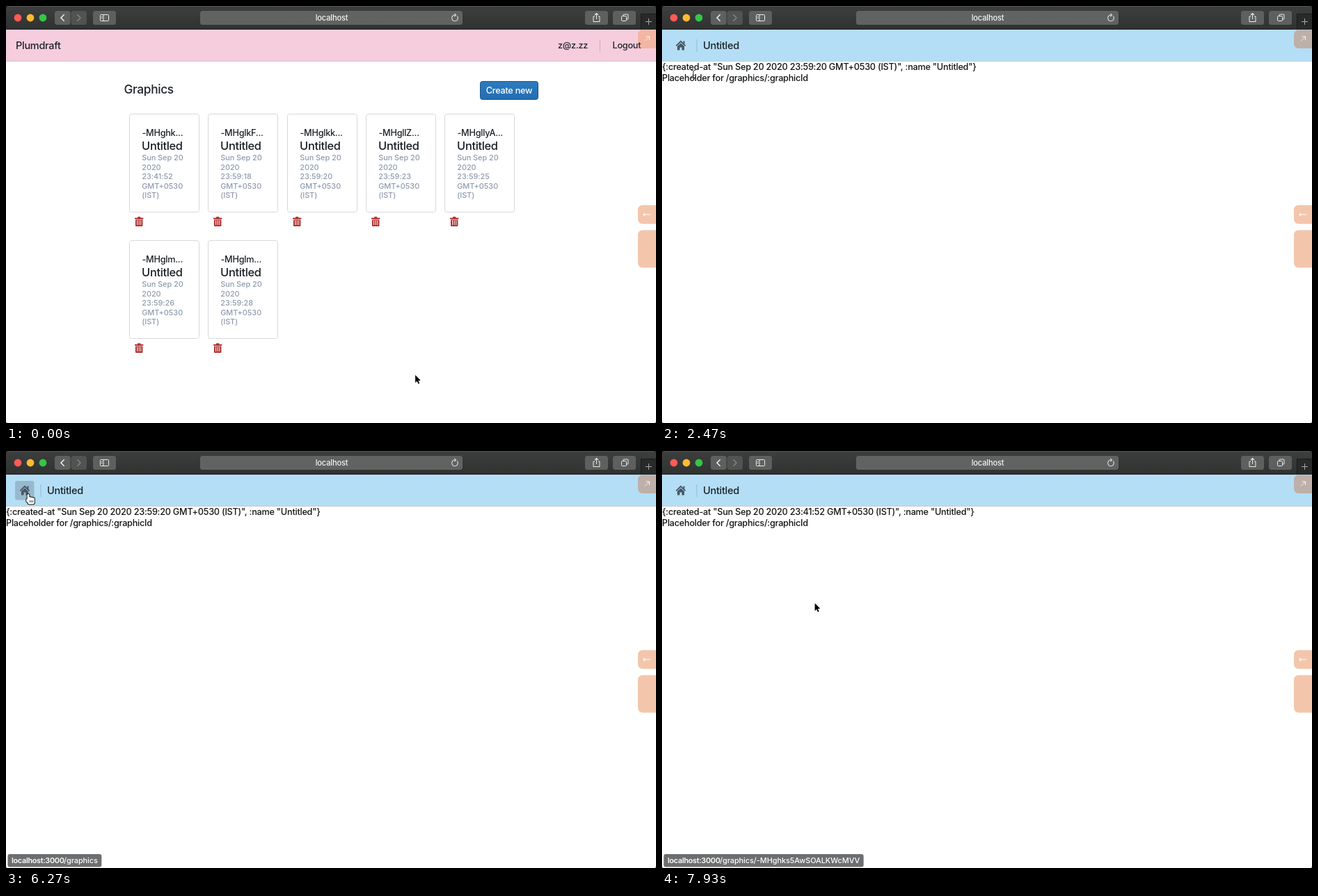
An HTML page with a canvas for the animation above (8000 ms loop, 934 by 600 pixels).

```html
<!DOCTYPE html>
<html lang="en">
<head>
<meta charset="utf-8">
<title>Graphics list</title>
<style>
html, body { margin: 0; width: 100%; height: 100%; overflow: hidden; background: #fff; }
canvas { display: block; }
</style>
</head>
<body>
<canvas id="stage" width="934" height="600"></canvas>
<script>
const ctx = document.getElementById('stage').getContext('2d');
const LOOP = 8000;
const LOAD = 150;    // ms until a new graphic replaces the previous one
const LINGER = 500;  // ms the status bar outlives its link
const CARD = { w: 100, h: 141 };
const HOME = { x: 13, y: 43, w: 27.5, h: 27.5, url: '/graphics' };

const cards = [
  '-MHghk... 23:41:52 -MHghks5AwSOALKWcMVV',
  '-MHglkF... 23:59:18',
  '-MHglkk... 23:59:20 -MHglkkZl3mWahlh6c3p',
  '-MHgllZ... 23:59:23',
  '-MHgllyA... 23:59:25',
  '-MHglm... 23:59:26',
  '-MHglm... 23:59:28'
].map((row, i) => {
  const [label, time, key = label] = row.split(' ');
  return {
    ...CARD, label, time, url: '/graphics/' + key,
    x: Math.round(177 + (i % 5) * 113.25) + 0.5,
    y: 155.5 + Math.floor(i / 5) * 182
  };
});

const origin = { x: 587.5, y: 530 };
const moves = [
  { from: 100, to: 1000, x: 447.5, y: 192 },
  { from: 1520, to: 2470, x: 45, y: 98 },
  { from: 2470, to: 2720, x: 33, y: 63 },
  { from: 3450, to: 3750, x: 38, y: 72 },
  { from: 4420, to: 4650, x: 33, y: 63 },
  { from: 6430, to: 6670, x: 93, y: 148 },
  { from: 6670, to: 7350, x: 219, y: 218 }
];

// A click opens a card, or the list when it has none
const clicks = [
  { at: 1330, card: cards[2], before: cards[0] },
  { at: 6490 },
  { at: 7700, card: cards[0], before: cards[2] }
];

function pointerAt(t) {
  return moves.reduce((p, m) => {
    const u = Math.min(1, Math.max(0, (t - m.from) / (m.to - m.from)));
    const k = u * u * (3 - 2 * u);
    return { x: p.x + (m.x - p.x) * k, y: p.y + (m.y - p.y) * k };
  }, origin);
}

function graphicAt(t) {
  const click = clicks.filter(c => c.at <= t).pop();
  if (!click || !click.card) return null;
  return t - click.at < LOAD ? click.before : click.card;
}

const inside = (p, b) => p.x >= b.x && p.x <= b.x + b.w && p.y >= b.y && p.y <= b.y + b.h;

const linkAt = t => (graphicAt(t) ? [HOME] : cards).find(b => inside(pointerAt(t), b));

function statusAt(t) {
  for (let age = 0; age <= LINGER && age <= t; age += 20) {
    const link = linkAt(t - age);
    if (link) return link.url;
  }
}

function text(str, x, y, size, color, { weight = 450, track = -0.02, align = 'left' } = {}) {
  ctx.font = `${weight} ${size}px Inter, sans-serif`;
  ctx.letterSpacing = `${track * size}px`;
  ctx.textAlign = align;
  ctx.fillStyle = color;
  ctx.fillText(str, x, y);
}

function rect(x, y, w, h, color) {
  ctx.fillStyle = color;
  ctx.fillRect(x, y, w, h);
}

function paint(fill, stroke, width = 1) {
  if (fill) { ctx.fillStyle = fill; ctx.fill(); }
  if (stroke) { ctx.strokeStyle = stroke; ctx.lineWidth = width; ctx.stroke(); }
}

function round(x, y, w, h, r, fill, stroke, width) {
  ctx.beginPath();
  ctx.roundRect(x, y, w, h, r);
  paint(fill, stroke, width);
}

function line(points, color, width = 1) {
  ctx.beginPath();
  points.forEach(([x, y]) => ctx.lineTo(x, y));
  paint(null, color, width);
}

function arc(x, y, r, a0, a1, fill, stroke) {
  ctx.beginPath();
  ctx.arc(x, y, r, a0, a1);
  paint(fill, stroke, 1.1);
}

// Arrow head with its tip at x, y, turned by angle
function chevron(x, y, size, angle, color, width = 1.1) {
  ctx.save();
  ctx.translate(x, y);
  ctx.rotate(angle);
  line([[-size, -size], [0, 0], [-size, size]], color, width);
  ctx.restore();
}

function vertical(y0, y1, top, bottom) {
  const g = ctx.createLinearGradient(0, y0, 0, y1);
  g.addColorStop(0, top);
  g.addColorStop(1, bottom);
  return g;
}

function drawToolbar() {
  const ink = '#eee', key = '#5e5f5f';
  rect(0, 0, 934, 34, vertical(0, 34, '#3d3e3e', '#303131'));
  rect(0, 0, 934, 1, '#555');
  rect(0, 33, 934, 1, '#222');
  ['#fc5b57', '#fdbc2e', '#34c648'].forEach((color, i) => arc(17 + i * 18, 17, 5.4, 0, 7, color));
  round(93.5, 7, 22.5, 20, 3.5, '#515252');
  round(70, 7, 22.5, 20, 3.5, key);
  [125, 832, 872].forEach(x => round(x, 7, 33, 20, 3.5, key));
  round(279, 7, 377, 20, 3.5, '#616262');

  chevron(79, 17, 4.7, Math.PI, ink, 1.5);
  chevron(107, 17, 4.7, 0, '#858686', 1.4);
  round(135.5, 12.5, 12, 9, 1, null, ink);
  rect(139.5, 12.5, 1, 9, ink);
  [15, 17].forEach(y => rect(137, y, 1.5, 1, ink));
  text('localhost', 468, 21, 11.2, '#f2f2f2', { align: 'center' });

  arc(645, 17.3, 4.3, -0.7, 4.9, null, '#ddd');
  chevron(646.6, 13, 2.2, 0, '#ddd');

  line([[846, 15], [844, 15], [844, 22.5], [853, 22.5], [853, 15], [851, 15]], ink);
  rect(848, 10.8, 1, 8.2, ink);
  chevron(848.5, 10.5, 2.5, -Math.PI / 2, ink);
  round(887, 12, 7, 7, 1, null, ink);
  round(884.5, 14.5, 7, 7, 1, key, ink);

  rect(912, 11, 22, 23, '#191919');
  rect(913, 12, 21, 22, '#282929');
  rect(919, 22, 9, 1, '#aaa');
  rect(923, 18, 1, 9, '#aaa');
}

function drawNavbar(color, dividerX) {
  rect(0, 34, 934, 45, color);
  rect(0, 79, 934, 1, 'rgba(60,75,90,.28)');
  rect(dividerX, 48, 1, 18, 'rgba(60,75,95,.24)');
}

function drawWidgets(topColor) {
  const peach = '#f3c6ab', pale = '#f8eeea';
  round(908, 34.5, 40, 26.5, 6.5, topColor);
  line([[918, 50.5], [924.5, 44]], pale);
  chevron(924.5, 44, 3.5, -Math.PI / 4, pale);
  round(908, 286.5, 40, 27, 6.5, peach);
  rect(916, 299.5, 10.5, 1, '#fff');
  chevron(916, 300, 2, Math.PI, '#fff');
  round(908, 322.5, 40, 54, 6.5, peach);
}

function drawTrash(x, y) {
  const red = '#ad2b2b';
  round(x, y + 1.5, 12.4, 2, 0.6, red);
  round(x + 4, y, 4.4, 2, 0.8, red);
  round(x + 1, y + 4.2, 10.4, 9.6, 1, red);
  for (let i = 0; i < 3; i++) rect(x + 3.1 + i * 2.6, y + 5.2, 1, 6.8, '#fff');
}

function drawCard(card, hovered) {
  const { x, y, w, h } = card, left = x + 18;
  ctx.save();
  if (hovered) {
    ctx.shadowColor = 'rgba(16,22,26,.3)';
    ctx.shadowBlur = 16;
    ctx.shadowOffsetY = 5;
  }
  round(x, y, w, h, 3, '#fff');
  ctx.restore();
  round(x, y, w, h, 3, null, '#d6d8d9');
  text(card.label, left, y + 31.5, 12.7, '#1d2227');
  text('Untitled', left - 0.4, y + 51.3, 16.4, '#1a1f24');
  ['Sun Sep 20', '2020', card.time, 'GMT+0530', '(IST)'].forEach((row, i) =>
    text(row, left - 0.3, y + 66.5 + i * 13.5, 10.9, '#8e9bac', { track: -0.003 }));
  drawTrash(x + 7.5, y + 147.7);
}

function drawList(link) {
  const ink = '#20242a';
  drawNavbar('#f6cddd', 853);
  drawWidgets('#f3b6a2');
  text('Plumdraft', 14, 62, 14.5, ink);
  text('z@z.zz', 793, 61, 12.7, ink);
  text('Logout', 871.5, 61, 12.7, ink);
  text('Graphics', 169.5, 125.5, 17.3, ink);
  round(681.5, 108.5, 83, 26, 3, vertical(108, 135, '#2d7bc0', '#236db2'), '#1b568e');
  text('Create new', 723, 126, 12.7, '#fff', { align: 'center' });
  cards.forEach(c => drawCard(c, c === link));
}

function drawHome(hovered) {
  const slate = '#465665';
  if (hovered) round(HOME.x, HOME.y, HOME.w, HOME.h, 3, 'rgba(110,130,146,.4)');
  chevron(27, 50.8, 6.6, -Math.PI / 2, slate, 1.9);
  rect(30.5, 50.5, 2, 4, slate);
  ctx.beginPath();
  ctx.moveTo(22, 58);
  ctx.lineTo(27, 53.4);
  ctx.lineTo(32, 58);
  ctx.rect(22, 58, 3.5, 5.5);
  ctx.rect(25.5, 58, 3, 1.5);
  ctx.rect(28.5, 58, 3.5, 5.5);
  paint(slate);
}

function drawDetail(graphic, link) {
  const ink = '#121416';
  drawNavbar('#b4def6', 49.5);
  drawWidgets('#bdb0a8');
  drawHome(link === HOME);
  text('Untitled', 59, 62, 14.5, '#1c2329');
  text(`{:created-at "Sun Sep 20 2020 ${graphic.time} GMT+0530 (IST)", :name "Untitled"}`, 0, 91.5, 12.7, ink);
  text('Placeholder for /graphics/:graphicId', 0, 107.5, 12.7, ink);
}

function drawStatus(url) {
  if (!url) return;
  const style = { track: -0.005 };
  text(url, 83, 593, 10.9, '#fff', style);
  round(2.5, 580, 86 + ctx.measureText(url).width, 18.5, 3, '#6c6e70');
  text(url, 83, 593, 10.9, '#fff', style);
  text('localhost:3000', 8, 593, 10.9, '#fff', { weight: 600, track: -0.03 });
}

function drawArrow() {
  ctx.beginPath();
  ctx.moveTo(0.6, 1);
  ctx.lineTo(0.6, 12);
  ctx.lineTo(3.1, 9.7);
  ctx.lineTo(4.9, 13.7);
  ctx.lineTo(6.6, 12.9);
  ctx.lineTo(4.9, 9);
  ctx.lineTo(8.3, 8.7);
  ctx.closePath();
  paint(null, '#fff', 1.8);
  paint('#000');
}

function drawHand() {
  const shapes = () => {
    ctx.beginPath();
    ctx.roundRect(-2.4, -1, 2.8, 11, 1.4);
    for (let i = 1; i < 4; i++) ctx.roundRect(-2.4 + i * 2.5, 2.7 + i * 0.5, 2.8, 6, 1.4);
    ctx.roundRect(-3.8, 6, 3, 4.5, 1.4);
    ctx.roundRect(-1.8, 7, 9.7, 6.4, 2.5);
  };
  shapes();
  paint(null, '#111', 2);
  shapes();
  paint('#fff');
  for (let i = 0; i < 3; i++) rect(1 + i * 2.1, 8, 0.8, 3, '#222');
}

function drawBeam() {
  rect(-0.5, -4.5, 1, 9, '#222');
  rect(-1.5, 1, 3, 1, '#222');
  for (const side of [-1, 1]) {
    for (const end of [-1, 1]) line([[0, end * 4.5], [side, end * 5.5], [side * 3, end * 5.5]], '#222');
  }
}

function drawPointer(p, link, graphic) {
  const onText = graphic && inside(p, { x: 0, y: 80, w: 448, h: 31 });
  ctx.save();
  ctx.translate(p.x, p.y);
  ctx.lineJoin = 'round';
  (link ? drawHand : onText ? drawBeam : drawArrow)();
  ctx.restore();
}

function drawCorners() {
  ctx.beginPath();
  ctx.rect(0, 0, 934, 600);
  ctx.roundRect(0, 0, 934, 601, 4);
  ctx.fillStyle = '#1b1b1b';
  ctx.fill('evenodd');
}

function draw(t) {
  const graphic = graphicAt(t), link = linkAt(t);
  rect(0, 0, 934, 600, '#fff');
  drawToolbar();
  if (graphic) drawDetail(graphic, link);
  else drawList(link);
  drawStatus(statusAt(t));
  drawCorners();
  drawPointer(pointerAt(t), link, graphic);
}

const start = performance.now();
function tick() {
  draw((performance.now() - start) % LOOP);
  requestAnimationFrame(tick);
}
tick();
</script>
</body>
</html>
```
